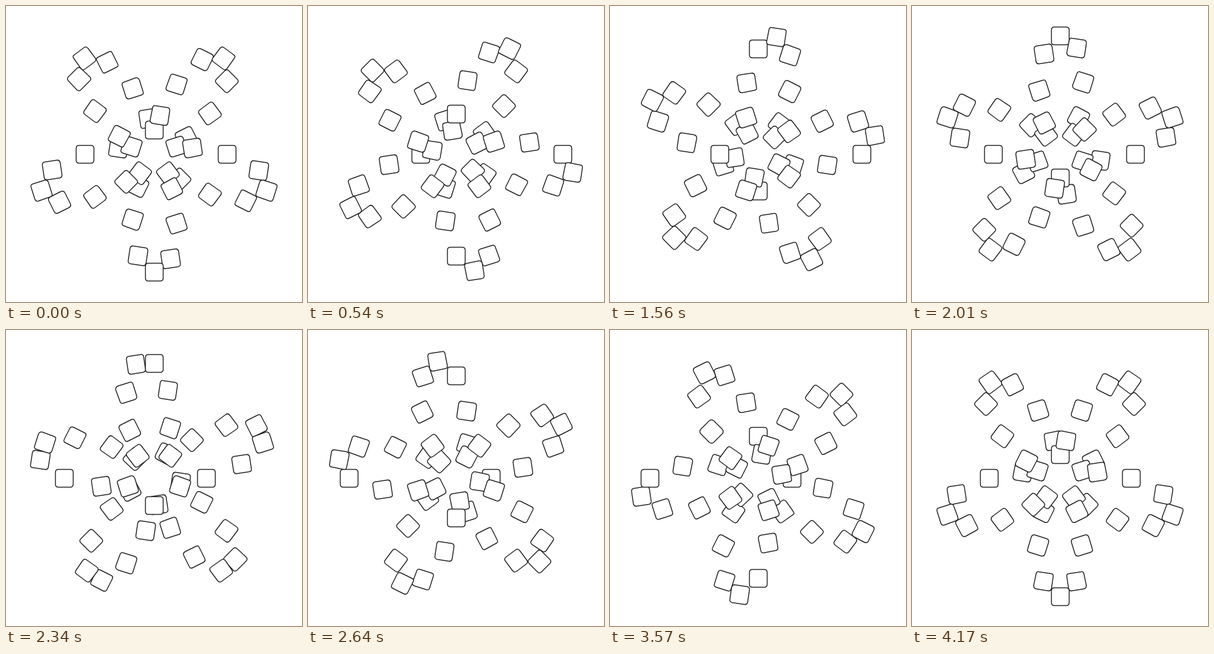
An HTML page with a canvas that plays this animation: 500x500 px, repeating every 4.2 s.

```html
<!DOCTYPE html>
<html lang="en">
<head>
<meta charset="utf-8">
<title>Wave of squares</title>
<style>
  html, body { margin: 0; width: 100%; height: 100%; overflow: hidden; background: #fff; }
  canvas { display: block; }
</style>
</head>
<body>
<canvas id="stage" width="500" height="500"></canvas>
<script>
const ctx = document.getElementById('stage').getContext('2d');
const STEPS = 140, STEP_MS = 30;
const COUNT = 40, WAVES = 5;
const HALF = 15, ROUND = 5;
const TAU = Math.PI * 2;

// Anchor points sit on pixel centres, which gives the edges their slight wobble.
const snap = v => Math.floor(v + 1e-4) + 0.5;

function square(angle, radius) {
  const c = Math.cos(angle), s = Math.sin(angle);
  const place = (x, y) => [250 + (radius + x) * c - y * s, 250 + (radius + x) * s + y * c];
  const inner = HALF - ROUND;

  ctx.beginPath();
  // Each corner is the first one turned by a quarter: (x, y) -> (-y, x).
  let turn = (x, y) => [x, y];
  for (let k = 0; k < 4; k++) {
    const from = place(...turn(inner, -HALF));
    const ctrl = place(...turn(HALF, -HALF));
    const to = place(...turn(HALF, -inner));
    const a = from.map(snap), b = to.map(snap);
    const mid = ctrl.map((v, i) => v + (a[i] - from[i] + b[i] - to[i]) / 2);
    ctx.lineTo(...a);
    ctx.quadraticCurveTo(...mid, ...b);
    const prev = turn;
    turn = (x, y) => prev(-y, x);
  }
  ctx.closePath();
  ctx.fill();
  ctx.stroke();
}

function draw(step) {
  const phase = TAU * (step + 1) / STEPS;
  ctx.fillStyle = '#fff';
  ctx.fillRect(0, 0, 500, 500);
  ctx.strokeStyle = '#202020';
  ctx.lineWidth = 1.5;
  for (let i = 0; i < COUNT; i++) {
    const angle = TAU * i / COUNT;
    square(angle, 120 + 80 * Math.cos(WAVES * (angle - TAU / 4) + phase));
  }
}

const start = performance.now();
function tick() {
  const elapsed = Math.max(0, performance.now() - start);
  draw(Math.floor(elapsed / STEP_MS) % STEPS);
  requestAnimationFrame(tick);
}
tick();
</script>
</body>
</html>
```
